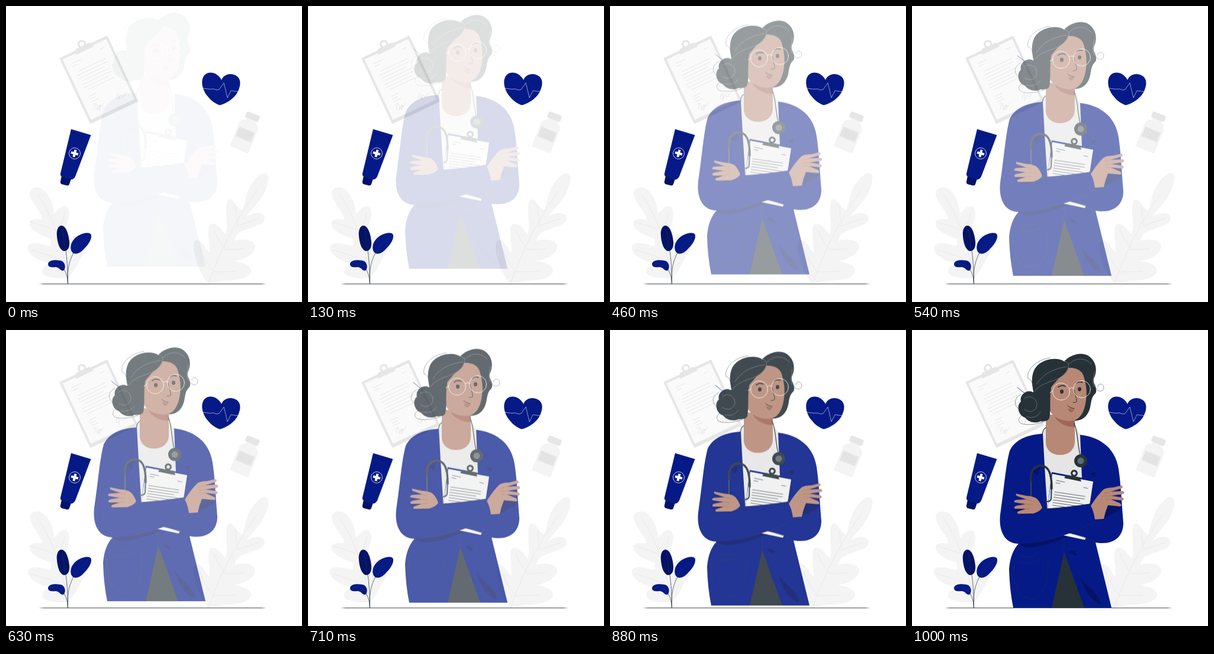
Write an HTML page that moves like this. It is 500 px wide and 500 px high and loops after 1.04 s.

```html
<!DOCTYPE html>
<html lang="en">
<head>
<meta charset="utf-8">
<title>Doctor</title>
<style>
  html, body { margin: 0; width: 100%; height: 100%; overflow: hidden; background: #fff; }
  svg { display: block; width: 100vw; height: 100vh; }
  .blue { fill: #051a87; }
  .navy { fill: #041367; }
  .ink { fill: #263238; }
  .skin { fill: #b78876; }
  .shade { fill: #a0665a; }
  .pale { fill: #f4f4f4; }
  .grey { fill: #e6e6e6; }
  .paper { fill: #fafafa; }
  .line { fill: none; stroke-linecap: round; stroke-linejoin: round; }
  .vein { stroke: #e6e6e6; stroke-width: .8; }
  .faint { stroke: #e0e0e0; stroke-width: .7; }
  .dark { stroke: #263238; stroke-width: .7; }
  .fold { stroke: #1b2a5c; stroke-width: .7; }
  .strand { stroke: #a9b1b5; stroke-width: .45; }
  .white { stroke: #fff; stroke-width: .8; }
</style>
</head>
<body>
<svg viewBox="0 0 500 500">
  <!-- oak leaves -->
  <path class="pale" d="M105 459C84 462 60 457 61 448C61 440 71 437 76 434C58 433 36 420 37 408C38 397 56 400 71 405C76 406 78 404 75 393C61 388 37 378 40 366C42 357 56 361 61 360C62 350 40 330 40 316C41 305 56 303 64 311C74 320 80 335 81 350C86 349 89 338 99 338C111 339 107 360 102 372C98 381 98 389 103 397C114 386 134 381 139 391C143 404 130 420 124 430C118 443 112 452 105 459Z"/>
  <path class="line vein" d="M53 318C76 350 91 390 105 459M41 365Q63 370 81 378M99 349Q97 365 87 384M42 412Q72 420 98 431M131 402Q111 415 99 436"/>
  <path class="pale" d="M342 469C328 455 316 421 317 404C318 392 327 394 333 402C337 408 339 413 344 416C345 403 338 376 345 369C353 363 363 376 371 386C377 375 367 335 376 327C385 323 388 342 399 345C404 336 404 314 417 298C425 287 434 280 440 283C447 288 442 304 436 316C428 332 415 342 406 356C417 348 436 347 437 358C438 371 410 374 396 382C389 386 387 391 386 397C400 392 419 395 421 405C421 420 399 430 382 431C394 431 414 437 414 447C413 461 386 464 369 464C357 465 350 467 342 469Z"/>
  <path class="line vein" d="M424 312C397 347 364 406 342 469M388 338Q388 357 392 370M427 359Q407 366 389 372M351 378Q359 397 369 409M401 410Q387 412 369 411M327 408Q337 433 349 447M389 448Q369 449 350 449"/>

  <!-- pinned clipboard -->
  <g transform="translate(90 88) rotate(-25.2)">
    <rect class="grey" width="89.5" height="123" rx="2"/>
    <rect class="paper" x="4" y="4.5" width="81.500" height="112.500"/>
    <circle cx="44.600" cy="-5" r="5.500" fill="none" stroke="#e6e6e6" stroke-width="3.400"/>
    <path class="grey" d="M32 -2H57Q60 2 61 7H28Q29 2 32 -2Z"/>
    <path class="line faint" id="notes"/>
    <path class="line faint" d="M15 17.500H32M15 22.500H23M69 16H76M18 80H31M18 85H28M18 90H31M18 95H24"/>
    <path class="line faint" d="M17 104C22 93 27 95 22 104S30 95 29 102S35 99 36 101M24 108C27 99 33 101 25 108M58 103C64 92 68 96 62 104S71 95 69 103S76 99 78 102"/>
  </g>

  <!-- medicine bottle -->
  <g transform="translate(404 217) rotate(22)">
    <path class="pale" d="M-8 -28H9V-24Q17 -21 17 -13V25Q17 28 14 28H-14Q-17 28 -17 25V-13Q-17 -21 -8 -24Z"/>
    <rect class="grey" x="-11.500" y="-38" width="23.500" height="11" rx="2.500"/>
    <rect class="grey" x="-14" y="-9" width="28" height="18"/>
    <rect x="-8" y="-5" width="16" height="10" fill="none" stroke="#dcdcdc" stroke-width=".8"/>
    <path class="line" stroke="#dcdcdc" stroke-width=".7" d="M-5 -1H5M-5 2H5M-12 -6V6M11 -6V6"/>
  </g>

  <!-- heart -->
  <path class="blue" d="M364 125C358 113 344 109 336 116C327 125 332 143 341 153C347 161 356 166 361 167.500C373 165 387 155 392 144C399 129 395 119 385 116C376 113 367 117 364 125Z"/>
  <path class="line" stroke="#fff" stroke-width=".55" d="M333 139L344 140.500L350 140L356 142L360 141L368 130L374 155L380 143L386 144L393 144.500"/>

  <!-- tube -->
  <path class="navy" d="M94 287L110 292L107 301Q106 304 102 303L94 301Q91 299 92 296Z"/>
  <path class="blue" d="M110 208L143.500 218L117 288Q114 294 109 293L96 289Q91 287 92 283Z"/>
  <path class="line" stroke="#041367" stroke-width=".8" d="M111 214L140 223M95 295L106 298"/>
  <g transform="translate(116 249) rotate(15)">
    <circle r="9.500" fill="none" stroke="#fff" stroke-width=".7"/>
    <path d="M-2 -6.200H2V-2H6.200V2H2V6.200H-2V2H-6.200V-2H-2Z" fill="#fff"/>
  </g>

  <!-- sprig -->
  <path class="line dark" d="M104.500 469Q105 440 100 405M104.500 469C103 446 106 428 119 409M104.500 469Q104 450 94 439"/>
  <path class="navy" d="M94 371C101 371 106 385 107 398C108 410 103 414 98 414C91 413 87 401 86 389C85 378 88 371 94 371Z"/>
  <path class="blue" d="M110 413C107 402 114 393 122 388C131 383 142 381 144 387C145 395 138 404 131 411C124 419 114 422 110 413ZM71 436C71 428 88 428 95 431C101 435 101 444 97 447C92 448 91 442 84 441C77 442 71 441 71 436Z"/>
  <path class="line" stroke="#263238" stroke-width=".6" d="M95 377Q99 394 99 410M140 388Q126 399 115 414M74 435Q88 434 97 443"/>

  <path class="ink" fill-opacity=".85" d="M55 469.500L64 469H431L440 469.500L431 470H64Z"/>

  <g id="doctor">
    <!-- bun and back hair -->
    <path class="ink" d="M204 105C195 100 181 109 184 121C176 127 179 144 191 148C198 157 211 158 217 154C226 157 230 148 229 138V105Z"/>
    <path class="line" stroke="#051a87" stroke-width=".8" d="M178 97L193 109"/>
    <path class="ink" d="M206 104C200 88 202 67 214 58C227 48 246 46 257 53C266 43 284 36 297 43C310 51 314 66 308 80C303 90 315 98 310 107C300 116 304 128 298 139C292 150 284 154 272 153L236 120Z"/>

    <!-- shirt and neck -->
    <path fill="#e5e5e5" d="M220 172L226 164L276 166L286 178L289 310H228Z"/>
    <path class="skin" d="M226 143H275V188C275 203 264 211 250 211C236 211 226 203 226 189Z"/>
    <path class="shade" d="M241 147L275 150V164C261 164 248 158 241 147Z"/>

    <!-- face -->
    <path class="skin" d="M263 64C276 63 287 68 290 78C294 92 296 104 294 118C292 136 285 151 272 153C256 156 239 148 233 137L232 100Z"/>
    <path class="ink" d="M264 65C257 82 238 82 235 98C232 117 235 135 232 149C229 156 219 155 216 148C209 136 207 120 205 104C201 82 206 66 230 58L257 53Z"/>
    <ellipse class="ink" cx="253" cy="104" rx="3" ry="3.400"/>
    <ellipse class="ink" cx="283" cy="100" rx="3" ry="3.400"/>
    <path class="line" stroke="#263238" stroke-width="1.700" d="M247 96.500Q252 92 259 95M278 89.500Q282 86.500 288 88.500"/>
    <path class="line" stroke="#263238" stroke-width="1" d="M274 101C275 109 279 116 278 121Q276 123 272 122.500M263 128Q267 132 274 133"/>
    <path class="shade" d="M264 132Q268 134 274 134Q272 139 268 139Q264 137 264 132Z"/>
    <path class="shade" d="M287 110h1v1h-1zM290 108h1v1h-1zM288 113h1v1h-1z"/>
    <g class="line white">
      <circle cx="252" cy="104" r="14.500"/>
      <circle cx="287" cy="100" r="14.500"/>
      <path d="M266 99Q270 96 273 98M238 103L233 106"/>
    </g>
    <path class="line strand" d="M263 66C251 91 223 82 207 104M257 53C266 54 265 60 263 66M261 62C238 66 221 74 211 91M265 58C276 46 293 46 303 58M308 70C306 84 304 89 308 96M190 116C199 108 211 116 211 126C210 139 196 140 190 134M194 147Q209 151 217 139"/>
    <path class="line dark" stroke-opacity=".7" d="M203 90Q202 84 196 82C193 69 207 51 233 47M309 92C309 105 324 107 324 97C323 89 313 90 314 96M184 109C173 114 171 126 180 133M188 143C179 146 177 157 188 159C198 161 211 159 224 155"/>

    <!-- stethoscope hanging from the neck -->
    <path class="line" stroke="#263238" stroke-width="1.200" d="M226 165Q220 168 220 181L221 220M274 158C280 169 279 190 284 211"/>

    <!-- trousers and coat -->
    <path class="ink" d="M257 370L294 469H233Z"/>
    <path class="blue" d="M221 175C199 177 176 182 165 204C158 230 156 265 149 312C146 340 157 361 180 361Q166 376 164 404Q165 440 171 469H236L257 375L291 469H337L310 359C340 364 357 350 357 326C354 290 353 262 349 235C343 195 312 180 284 177L287 250V310H229L224 230Z"/>
    <path class="line fold" d="M219 179Q219 210 216 231L203 239L211 246Q222 268 227 301M289 219L311 239L301 242L308 249M257 349V375"/>
    <path class="line fold" d="M171 398C170 428 178 455 203 454C224 450 231 424 229 388M183 391Q198 398 216 387M184 382Q198 387 211 380"/>
    <path class="navy" d="M285 417C295 436 315 441 319 463C307 462 290 441 285 417ZM265 374C273 371 279 377 278 381Q270 381 265 374Z"/>
    <path class="navy" d="M178 360C202 363 250 350 308 326L304 331C263 350 215 372 188 366Z"/>
    <path class="navy" d="M203 239L217 231L212 246ZM301 242L311 239L308 249Z"/>

    <!-- chest piece -->
    <circle class="ink" cx="285" cy="221" r="11"/>
    <circle cx="285" cy="221" r="5.500" fill="#5d6b72"/>

    <!-- held clipboard -->
    <path class="blue" d="M236 240L310 254L301 302H229Z"/>
    <path fill="#efefef" d="M237 243L306 256L299 302H229Z"/>
    <path fill="#efefef" d="M247 345L262 341L295 348L292 354.500Z"/>
    <circle cx="274" cy="242" r="4.300" fill="none" stroke="#263238" stroke-width="3.200"/>
    <path class="ink" d="M262 245L283 249Q285 252 286 256L257 250Q259 246 262 245Z"/>
    <path class="line dark" id="chart"/>
    <path class="line dark" d="M244 254L258 257M243 258L250 259.500M290 266L297 267.500"/>

    <!-- earpiece loop -->
    <path class="line" stroke="#37474f" stroke-width="2.200" d="M201 286V252M236 262L235 285Q234 290 227 290"/>
    <path class="line" stroke="#263238" stroke-width="3.400" d="M201 255C199 238 207 228 219 229C231 231 236 242 236 268"/>

    <!-- forearms -->
    <path class="blue" d="M160 320L205 311L220 302Q262 300 303 293L330 310L310 325C280 340 242 352 214 358Q185 364 165 357Z"/>
    <path class="blue" d="M262 342L312 318L335 350L318 360Q300 351 262 342Z"/>
    <path class="line fold" d="M310 322C288 338 244 351 214 358M310 359Q293 349 262 342M219 303Q260 300 302 294"/>

    <!-- hands -->
    <path class="navy" d="M172 303L181 312L205 311L197 300ZM331 296L354 298L351 304Q337 312 324 318Z"/>
    <path class="skin" d="M176 276.500Q174 279 179 281L193 286L176 287Q171 288 173 291Q183 293 192 294L176 297Q171 299 174 302L192 302L179 306.500Q176 309 180 310.500L205 310Q217 306 220 300Q215 287 208 283Q200 280 193 280Z"/>
    <path class="skin" d="M302 297Q314 278 324 269Q330 266 340 266L354 262.500Q357 264 355 267L336 273L356 272Q360 274 357 277L337 280L356 283Q359 285 356 288L336 286L352 293Q355 296 352 298L331 296Q326 308 324 319L309 320Q307 306 302 297Z"/>
    <path class="line" stroke="#a0665a" stroke-width=".6" d="M193 286L202 288M192 294L202 295M192 302L201 301M336 273L325 276M337 280L326 281M336 286L327 286"/>
  </g>
</svg>
<script>
  const rows = (count, row) => Array.from({ length: count }, (_, i) => row(i)).join('');
  const draw = (id, d) => document.getElementById(id).setAttribute('d', d);

  draw('notes', rows(7, i => `M${i % 3 ? 16 : 20} ${34 + i * 5.8}H${i % 3 === 2 ? 62 : 70}`));
  draw('chart', rows(6, i => `M${241 - i * .7} ${273.5 + i * 4.5}l${i % 3 === 2 ? 44 : 51} ${i % 3 === 2 ? 6.500 : 7.500}`));

  // 25 equal steps; the small head start lines them up with the 10 ms clock
  document.getElementById('doctor').animate(
    [
      { opacity: .04, transform: 'translateY(-28.8px)' },
      { opacity: 1, transform: 'translateY(0px)' }
    ],
    { duration: 1040, delay: -5, iterations: Infinity, easing: 'steps(25, jump-none)' }
  );
</script>
</body>
</html>
```
